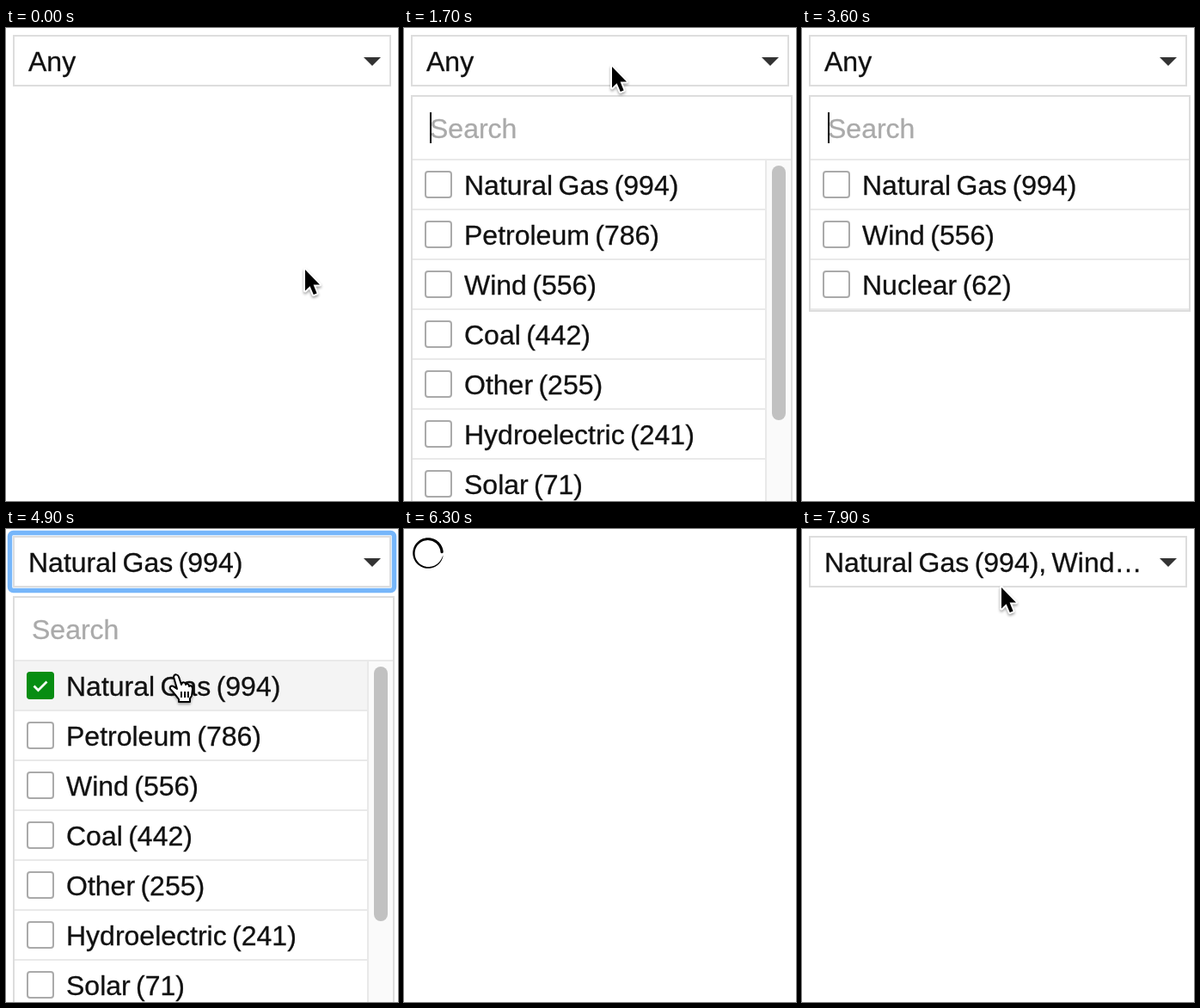
An HTML page that plays this animation: 456 px wide and 550 px high, repeating every 8000 ms.

```html
<!DOCTYPE html>
<html lang="en">
<head>
<meta charset="utf-8">
<title>Multi-select filter</title>
<style>
  html, body { margin: 0; width: 100%; height: 100%; overflow: hidden; background: #fff; }
  svg { display: block; width: 456px; height: 550px; }
  text {
    font: 32px "Liberation Sans", Arial, sans-serif; word-spacing: -2.5px; white-space: pre;
    fill: #111; stroke: #111; stroke-width: .3;
  }
  .frame { fill: #fff; stroke: #ddd; stroke-width: 2; }
  .line { stroke: #e9e9e9; stroke-width: 2; }
  .box { fill: #fff; stroke: #aaa; stroke-width: 2; }
  .tick { fill: none; stroke: #f2faf2; stroke-width: 2.8; }
  .hover { fill: #f4f4f4; }
  #ring { fill: none; stroke: #76b6fa; stroke-width: 5.5; filter: blur(.6px); }
  #hint { fill: #aaa; stroke: #aaa; }
  #cursor { filter: drop-shadow(0 2px 1.5px rgba(0, 0, 0, .35)); }
  #arrow { stroke: #fff; stroke-width: 4; stroke-linejoin: round; paint-order: stroke; }
  #hand { fill: #fff; stroke: #000; stroke-width: 2; stroke-linejoin: round; }
</style>
</head>
<body>
<svg viewBox="0 0 456 550">
  <g id="page">
    <rect id="ring" x="4.5" y="4.5" width="447" height="67" rx="4"/>
    <rect class="frame" x="9" y="9" width="438" height="58"/>
    <text id="value" x="26" y="50"></text>
    <path d="M416 34H436L426 44Z" fill="#333"/>
    <g id="menu">
      <rect id="panel" class="frame" x="9" y="79" width="442"/>
      <text id="hint" x="30" y="128">Search</text>
      <text id="query" x="30" y="128">n</text>
      <rect id="caret" y="98" width="2" height="36"/>
      <path class="line" d="M10 153H450"/>
      <g id="rows"></g>
      <g id="scroll">
        <rect x="420" y="154" width="30" height="400" fill="#fafafa"/>
        <path class="line" d="M421 154V550"/>
        <rect x="428" y="160" width="16" height="296" rx="8" fill="#c1c1c1"/>
      </g>
    </g>
  </g>
  <path id="spinner"/>
  <g id="cursor">
    <path id="arrow" d="M0 0V24.5L5.6 19.3L9.8 29L13.6 27.4L9.6 17.6H17Z"/>
    <g id="hand" transform="translate(-8 -1)">
      <path d="M5 4C6 0 10 1 11 4L14 13C15 9 19 10 19 13C20 11 23 12 23 15C25 13 27 15 27 18L26 26L24 29V33H11V30C8 26 5 22 1 18C0 15 3 13 6 16L9 18Z"/>
      <path d="M14 21V28M18 21V28M22 21V28"/>
    </g>
  </g>
</svg>
<script>
const $ = id => document.getElementById(id);
const show = (el, on) => el.style.display = on ? '' : 'none';
const LOOP = 8000, STEP = 100, ROW = 58, TOP = 153;

const labels = ['Natural Gas (994)', 'Petroleum (786)', 'Wind (556)', 'Coal (442)',
  'Other (255)', 'Hydroelectric (241)', 'Solar (71)', 'Nuclear (62)'];

// Time each option becomes checked
const checkedAt = { 0: 4700, 2: 5300 };

// Pointer waypoints: time, x, y; without a place it is hidden
const track = [
  [0, 348, 281], [100],
  [800, 408, 106], [1200, 242, 45], [2700, 242, 45], [2800],
  [4200, 242, 45], [4500, 214, 196], [4700, 198, 169], [4900, 198, 169],
  [5200, 200, 298], [5300, 200, 298], [5600, 433, 336], [5700],
  [7200, 170, 287], [7900, 232, 68]
];

const caretOn = [[1700, 2200], [2700, 3400], [3500, 4100], [4600, 4700]];

const rows = labels.map(label => {
  const g = document.createElementNS('http://www.w3.org/2000/svg', 'g');
  g.innerHTML = `<rect class="hover" x="10" y="1" width="440" height="56"/>
    <path class="line" d="M10 58H450"/>
    <rect class="box" x="25" y="14" width="30" height="30" rx="3"/>
    <g class="on"><rect x="24" y="13" width="32" height="32" rx="4" fill="#078d12"/>
    <path class="tick" d="M32.5 29.5L37.5 34.5L47.5 24.5"/></g>
    <text x="70" y="41">${label}</text>`;
  $('rows').append(g);
  return { g, label, hover: g.querySelector('.hover'), on: g.querySelector('.on') };
});

// Tapered ring, thin end first
function spinnerPath() {
  const outer = [], inner = [], n = 60;
  for (let i = 0; i <= n; i++) {
    const f = i / n, a = (10 + 345 * f) * Math.PI / 180;
    const at = r => `${(r * Math.cos(a)).toFixed(2)} ${(r * Math.sin(a)).toFixed(2)}`;
    outer.push(at(17.8));
    inner.unshift(at(17.5 - 3 * Math.sqrt(f)));
  }
  return `M${outer.join('L')}A1.6 1.6 0 0 1 ${inner.join('L')}Z`;
}
$('spinner').setAttribute('d', spinnerPath());

function pointer(t) {
  const i = track.findLastIndex(p => p[0] <= t);
  const [t0, x, y] = track[i], next = track[i + 1];
  if (x === undefined) return null;
  if (!next || next[1] === undefined) return { x, y };
  const k = (t - t0) / (next[0] - t0), e = k * k * (3 - 2 * k);
  return { x: x + (next[1] - x) * e, y: y + (next[2] - y) * e };
}

function draw(t) {
  const within = (a, b) => t >= a && t < b;
  const loading = within(6300, 7100), open = within(1700, 6300);
  const typed = within(2800, 3600), filtered = within(2900, 3700);
  const p = pointer(t);
  const inRows = open && p && p.y > TOP && p.x < 420;
  const hovered = inRows ? Math.floor((p.y - TOP) / ROW) : -1;

  show($('page'), !loading);
  show($('spinner'), loading);
  $('spinner').setAttribute('transform', `translate(28 28) rotate(${(t - 6300) * 0.36})`);
  show($('ring'), within(1600, 1700) || within(4800, 6300));
  $('value').textContent = t < 4800 ? 'Any'
    : t < 5400 ? labels[0] : labels[0] + ', Wind…';

  show($('menu'), open);
  $('panel').setAttribute('height', filtered ? 250 : 600);
  show($('scroll'), !filtered);
  show($('hint'), !typed);
  show($('query'), typed);
  show($('caret'), caretOn.some(([a, b]) => within(a, b)));
  $('caret').setAttribute('x', typed ? 48 : 30);

  let slot = 0;
  rows.forEach((row, i) => {
    const visible = !filtered || /n/i.test(row.label);
    show(row.g, visible);
    if (!visible) return;
    row.g.setAttribute('transform', `translate(0 ${TOP + ROW * slot++})`);
    show(row.hover, i === hovered);
    show(row.on, t >= checkedAt[i]);
  });

  show($('cursor'), p);
  if (p) $('cursor').setAttribute('transform', `translate(${p.x} ${p.y})`);
  show($('arrow'), !inRows);
  show($('hand'), inRows);
}

const start = performance.now();
function tick() {
  const t = Math.max(0, performance.now() - start) % LOOP;
  draw(Math.floor(t / STEP) * STEP);
  requestAnimationFrame(tick);
}
tick();
</script>
</body>
</html>
```
